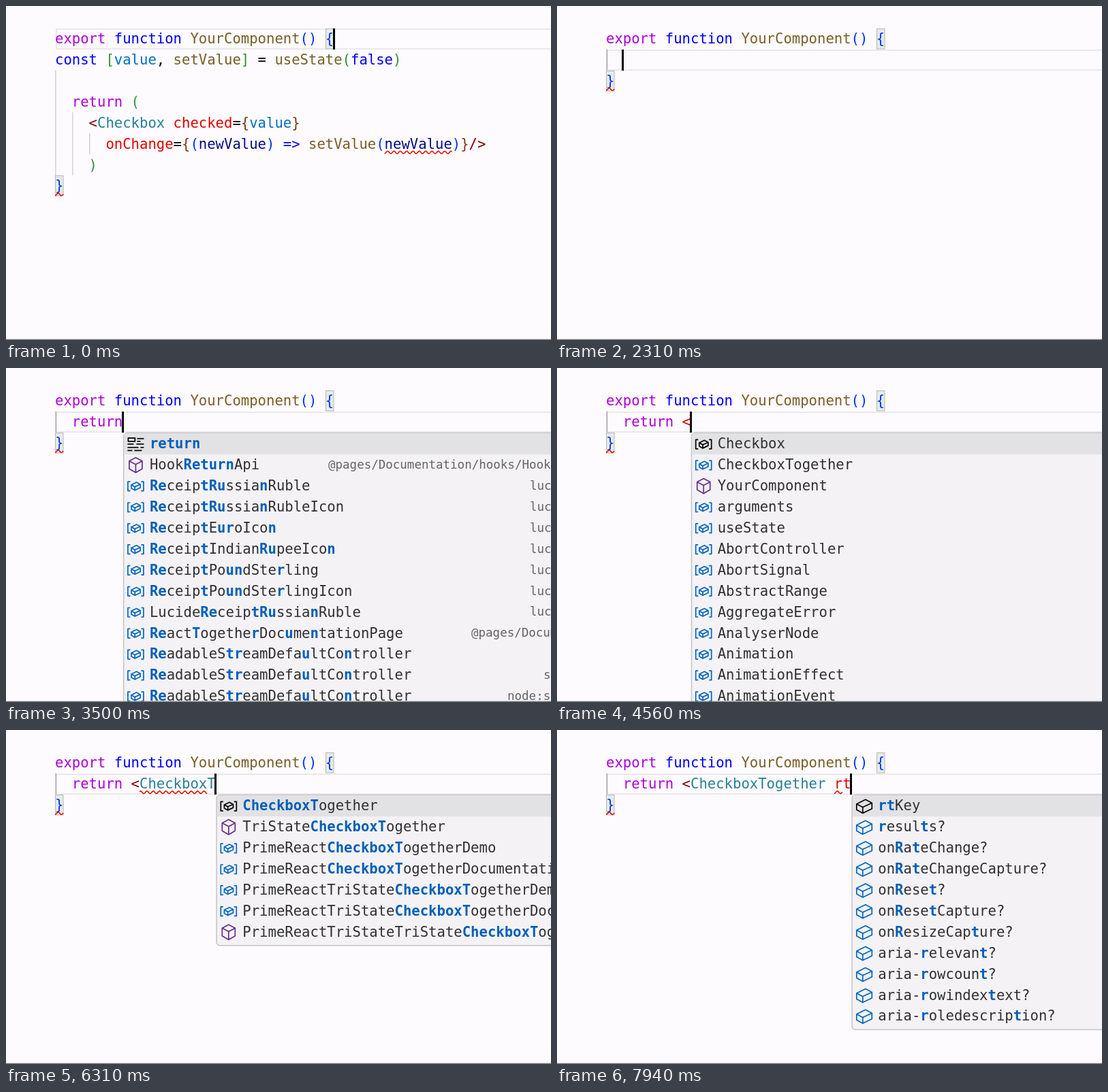
Recreate the animation shown at these times as an HTML page with a canvas. Size 800x491 px, loop 8000 ms.

```html
<!DOCTYPE html>
<html lang="en">
<head>
<meta charset="utf-8">
<title>Code editor</title>
<style>
html, body { margin: 0; width: 100%; height: 100%; overflow: hidden; background: #fdfbfe; }
canvas { display: block; }
</style>
</head>
<body>
<canvas id="stage" width="800" height="491"></canvas>
<script>
const ctx = document.getElementById('stage').getContext('2d');
const LOOP = 8000, LEFT = 72, TOP = 32.7, ADV = 12.4, PITCH = 30.9;
const MONO = '"DejaVu Sans Mono", monospace';
const INK = {
  kw: '#af00db', decl: '#0000ff', fn: '#795e26', type: '#267f99', attr: '#e50000', tag: '#800000',
  cst: '#0070c1', arg: '#001080', b1: '#0431fa', b2: '#319331', b3: '#7b3814', txt: '#000000'
};
const colX = col => LEFT + col * ADV;
const lineY = line => TOP + line * PITCH;

// Each line is an indent followed by [ink, text] pairs.
const HEAD = [0, ['kw', 'export '], ['decl', 'function '], ['fn', 'YourComponent'], ['b1', '() {']];
const TAIL = [0, ['b1', '}']];
const BODY = [
  [0, ['decl', 'const '], ['b2', '['], ['cst', 'value'], ['txt', ', '], ['fn', 'setValue'], ['b2', ']'],
    ['txt', ' = '], ['fn', 'useState'], ['b2', '('], ['decl', 'false'], ['b2', ')']],
  [0],
  [2, ['kw', 'return '], ['b2', '(']],
  [4, ['tag', '<'], ['type', 'Checkbox '], ['attr', 'checked'], ['txt', '='], ['b3', '{'], ['cst', 'value'], ['b3', '}']],
  [6, ['attr', 'onChange'], ['txt', '='], ['b3', '{'], ['b1', '('], ['arg', 'newValue'], ['b1', ')'],
    ['decl', ' => '], ['fn', 'setValue'], ['b1', '('], ['arg', 'newValue'], ['b1', ')'], ['b3', '}'], ['tag', '/>']],
  [4, ['b2', ')']]
];
const FULL = [HEAD, ...BODY, TAIL];
const lineLen = ([indent, ...parts]) => parts.reduce((n, p) => n + p[1].length, indent);

// Selection end over time: [ms, line, column].
const DRAG = [[60, 1, 8], [130, 1, 33], [190, 2, 0], [250, 3, 10], [320, 4, 29], [380, 5, 33], [500, 5, 45],
  [690, 5, 51], [760, 6, 5]];
const DELETE_AT = 1380, ENTER_AT = 1950;

const TYPED = 'return <CheckboxTogether rt';
const KEYS = [2560, 2690, 2830, 3000, 3190, 3320, 3750, 4130,
  4940, 5120, 5250, 5440, 5570, 5750, 5880, 6010, 6190, 6320, 6440, 6630, 6690, 6760, 6940, 7060,
  7380, 7560, 7750];

// Icon letter, label with the matched letters in brackets, then an optional side note and its x.
const RETURN_LIST = [
  'k|[return]', 'c|Hook[Return]Api|@pages/Documentation/hooks/HookReturnApi|473',
  'v|[Re]ceip[t][Ru]ssia[n]Ruble|lucide-react|769', 'v|[Re]ceip[t][Ru]ssia[n]RubleIcon|lucide-react|769',
  'v|[Re]ceip[t]E[ur]oIco[n]|lucide-react|769', 'v|[Re]ceip[t]Indian[Ru]peeIco[n]|lucide-react|769',
  'v|[Re]ceip[t]Po[un]dSte[r]ling|lucide-react|769', 'v|[Re]ceip[t]Po[un]dSte[r]lingIcon|lucide-react|769',
  'v|Lucide[Re]ceip[t][Ru]ssia[n]Ruble|lucide-react|769',
  'v|[Re]act[T]ogethe[r]Doc[u]me[n]tationPage|@pages/Documentation|683',
  'v|[Re]adableS[tr]eamDefa[u]ltCo[n]troller', 'v|[Re]adableS[tr]eamDefa[u]ltCo[n]troller|stream/web|789',
  'v|[Re]adableS[tr]eamDefa[u]ltCo[n]troller|node:stream/web|736'
];
const vars = names => names.split(' ').map(n => 'v|' + n);
const TAG_LIST = vars('Checkbox CheckboxTogether YourComponent arguments useState AbortController AbortSignal ' +
  'AbstractRange AggregateError AnalyserNode Animation AnimationEffect AnimationEvent');
TAG_LIST[2] = 'c|YourComponent';
const CHECK_LIST = vars(' box boxTogether Check CheckIcon Circle Circle2 Circle2Icon CircleIcon CircledIcon Icon Icon Square')
  .map((s, i) => s.replace('|', '|[Check]') + (i === 9 || i === 11 ? '|@radix-ui/react-icons|758' : ''));
const TOGETHER_LIST = ['v|#', 'c|TriState#', 'v|PrimeReact#Demo', 'v|PrimeReact#Documentation',
  'v|PrimeReactTriState#Demo', 'v|PrimeReactTriState#Documentation', 'c|PrimeReactTriStateTriState#']
  .map(s => s.replace('#', '[CheckboxTogether]'));
const fields = names => names.split(' ').map(n => 'f|' + n);
const PROP_LIST = fields('rtKey about? accessKey? aria-activedescendant? aria-atomic? aria-autocomplete? ' +
  'aria-braillelabel? aria-busy? aria-checked? aria-colcount? aria-colindex? aria-colspan? aria-controls?');
const RT_LIST = fields('[rt]Key [r]esul[t]s? on[R]a[t]eChange? on[R]a[t]eChangeCapture? on[R]ese[t]? ' +
  'on[R]ese[t]Capture? on[R]esizeCap[t]ure? aria-[r]elevan[t]? aria-[r]owcoun[t]? ' +
  'aria-[r]owindex[t]ext? aria-[r]oledescrip[t]ion?');

// Suggestions for n typed letters, and how many of them are matched.
function suggestions(n, t) {
  if (n < 1 || n === 7) return null;
  if (n < 7) return [RETURN_LIST, n];
  if (n === 8) return t >= 4380 ? [TAG_LIST, 0] : null;
  if (n < 14) return [CHECK_LIST, n - 8];
  if (n < 25) return t < 7190 ? [TOGETHER_LIST, n - 8] : null;
  return n === 25 ? [PROP_LIST, 0] : [RT_LIST, n - 25];
}

function text(str, x, y, color, size = 20.6, bold = false) {
  ctx.font = `${bold ? 'bold ' : ''}${size}px ${MONO}`;
  ctx.fillStyle = color;
  const step = size * ADV / 20.6;
  [...str].forEach((ch, i) => ch !== ' ' && ctx.fillText(ch, x + i * step, y));
}

function codeLine([indent, ...parts], line) {
  let col = indent;
  for (const [ink, str] of parts) {
    text(str, colX(col), lineY(line) + 22.4, INK[ink]);
    col += str.length;
  }
}

function box(x, y, w, h, color) {
  ctx.fillStyle = color;
  ctx.fillRect(x, y, w, h);
}

function stroke(points, closed) {
  ctx.beginPath();
  points.forEach(([x, y]) => ctx.lineTo(x, y));
  if (closed) ctx.closePath();
  ctx.stroke();
}

function squiggle(from, to, line) {
  const end = colX(to), y = lineY(line) + 28;
  ctx.beginPath();
  for (let x = colX(from); x <= end; x += 0.5) ctx.lineTo(x, y + 1.8 * Math.cos((x - LEFT) * Math.PI * 2 / 9.3));
  ctx.strokeStyle = '#e51400';
  ctx.lineWidth = 1.6;
  ctx.stroke();
}

function bracketBox(col, line) {
  const x = Math.round(colX(col)) + 0.5, y = Math.round(lineY(line)) + 0.5;
  box(x, y, 11.5, 29.5, '#e5ece6');
  ctx.strokeStyle = '#b5b5b5';
  ctx.lineWidth = 1;
  ctx.strokeRect(x, y, 11.5, 29.5);
}

function currentLine(line) {
  ctx.strokeStyle = '#eae8eb';
  ctx.lineWidth = 2;
  ctx.strokeRect(74, Math.round(lineY(line)) + 1, 740, 29);
}

function cursor(col, line) {
  box(Math.round(colX(col) - 1.4), Math.round(lineY(line)), 3, 31, '#000');
}

const slab = k => {
  const p = (x, y) => [x * k, y * k];
  stroke([p(-11, -3), p(2, -9.5), p(11.5, -4.5), p(11.5, 4), p(-2, 10.5), p(-11, 5.5)], true);
  stroke([p(-11, -3), p(-2, 1.8), p(11.5, -4.5)]);
  stroke([p(-2, 1.8), p(-2, 10.5)]);
};
const ICONS = {
  f: ['#0066bf', () => slab(1)],
  v: ['#0066bf', () => {
    for (const s of [-1, 1]) stroke([[s * 8, -6.5], [s * 11.5, -6.5], [s * 11.5, 7], [s * 8, 7]]);
    slab(0.58);
  }],
  c: ['#652d90', () => {
    stroke([[0, -11], [9.5, -6], [9.5, 5.5], [0, 11], [-9.5, 5.5], [-9.5, -6]], true);
    stroke([[-9.5, -6], [0, -1], [9.5, -6]]);
    stroke([[0, -1], [0, 11]]);
  }],
  k: ['#222', () => {
    ctx.strokeRect(-11, -9, 10, 5);
    const dashes = [[2, 12, -8], [2, 7, -4], [-12, -3, 0], [1, 12, 0], [-12, 4, 5], [7, 12, 5], [-12, -5, 9.5], [-2, 9, 9.5]];
    for (const [a, b, y] of dashes) stroke([[a, y], [b, y]]);
  }]
};

function icon(kind, x, y, selected) {
  const [color, draw] = ICONS[kind];
  ctx.save();
  ctx.translate(x, y);
  ctx.strokeStyle = selected ? '#000' : color;
  ctx.lineWidth = 1.7;
  ctx.lineJoin = 'round';
  draw();
  ctx.restore();
}

function label(str, matched, x, y) {
  let inside = false;
  for (const ch of str) {
    if (ch === '[' || ch === ']') { inside = ch === '['; continue; }
    const hit = inside && matched-- > 0;
    text(ch, x, y, hit ? '#005fb8' : '#303030', 20.6, hit);
    x += ADV;
  }
}

function popup(list, matched, x) {
  const h = list.length * PITCH + 5;
  ctx.beginPath();
  ctx.roundRect(x + 1.5, 95.5, 900, h, 5);
  ctx.fillStyle = '#f4f2f5';
  ctx.fill();
  ctx.strokeStyle = '#c4c3c6';
  ctx.lineWidth = 1.5;
  ctx.stroke();
  box(x + 2.5, 96.3, 800, PITCH, '#e2e1e4');
  list.forEach((row, i) => {
    const [kind, name, note, noteX] = row.split('|');
    const y = 111 + i * PITCH;
    icon(kind, x + 19.2, y + 0.8, i === 0);
    label(name, matched, x + 39.7, y + 7.4);
    if (note) text(note, +noteX, y + 6.2, '#646366', 17.5);
  });
}

function selection(line, col) {
  for (let i = 0; i <= line; i++) {
    const from = i ? 0 : 33;
    const to = i < line ? lineLen(FULL[i]) + 1 : col;
    box(colX(from), lineY(i), (to - from) * ADV, PITCH + 0.3, '#add6ff');
  }
}

function fullCode(t) {
  const drag = DRAG.filter(d => d[0] <= t).pop();
  if (drag) {
    selection(drag[1], drag[2]);
  } else {
    currentLine(0);
    bracketBox(32, 0);
    bracketBox(0, 7);
  }
  box(72, lineY(2), 1.5, PITCH * 5, '#d3d2d4');
  box(97, lineY(4), 1.5, PITCH * 3, '#d3d2d4');
  box(122, lineY(5), 1.5, PITCH, '#d3d2d4');
  FULL.forEach(codeLine);
  squiggle(39, 47, 5);
  squiggle(0, 1, 7);
  if (drag) cursor(drag[2], drag[1]);
  else cursor(33, 0);
}

function typedLine(n, t) {
  const s = TYPED.slice(0, n);
  const tagInk = n === 8 ? 'attr' : 'tag';
  codeLine([2, [n < 6 ? 'arg' : 'kw', s.slice(0, 7)], [tagInk, s.slice(7, 8)],
    ['type', s.slice(8, 24)], ['attr', s.slice(24)]], 1);
  if (n > 9 && n < 14) squiggle(10, 2 + n, 1);
  else if (n >= 14 && t < 7060) squiggle(10, Math.min(2 + n, 18), 1);
  if (t >= 7690) squiggle(27, 28, 1);
}

function shortCode(t) {
  const entered = t >= ENTER_AT, last = entered ? 2 : 1;
  const n = KEYS.filter(k => k <= t).length;
  currentLine(last - 1);
  bracketBox(32, 0);
  bracketBox(0, last);
  codeLine(HEAD, 0);
  codeLine(TAIL, last);
  squiggle(0, 1, last);
  if (!entered) return cursor(33, 0);
  box(72.5, lineY(1), 1.5, PITCH, '#a9a8aa');
  typedLine(n, t);
  const open = suggestions(n, t);
  if (open) popup(...open, colX(2 + n));
  cursor(2 + n, 1);
}

function frame() {
  const t = performance.now() % LOOP;
  box(0, 0, 800, 491, '#fdfbfe');
  if (t < DELETE_AT) fullCode(t);
  else shortCode(t);
  box(0, 489.7, 800, 1.3, '#777');
  requestAnimationFrame(frame);
}
frame();
</script>
</body>
</html>
```
